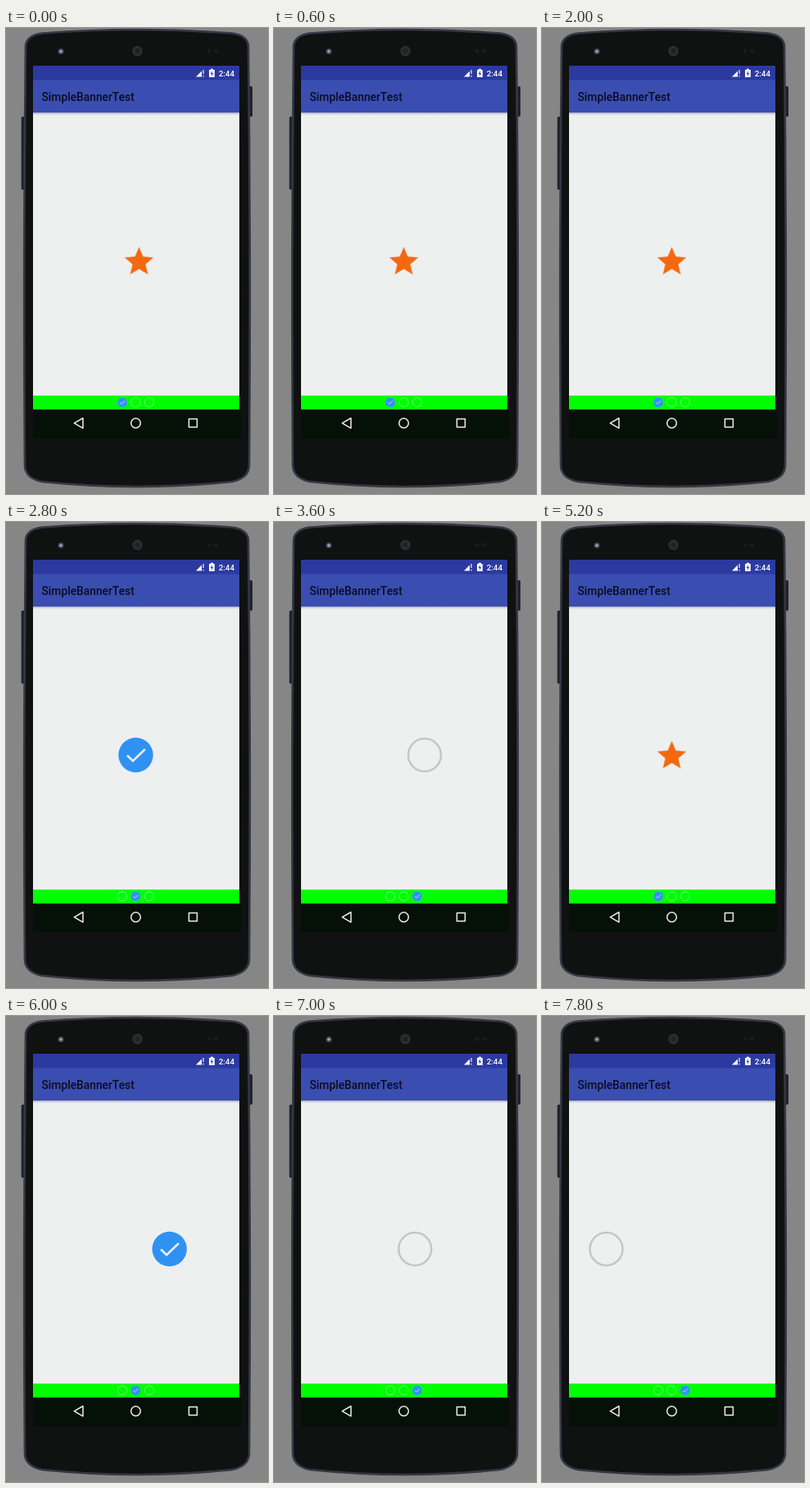
An HTML page that plays this animation: 320x568 px, repeating every 8000 ms.

```html
<!DOCTYPE html>
<html lang="en">
<head>
<meta charset="utf-8">
<title>Banner</title>
<style>
  html, body { margin: 0; width: 100%; height: 100%; overflow: hidden; background: #868686; }
  svg { display: block; width: 320px; height: 568px; }
  text { font-family: Roboto, sans-serif; }
</style>
</head>
<body>
<svg viewBox="0 0 320 568">
  <defs>
    <clipPath id="screen"><rect x="33" y="103" width="252" height="345"/></clipPath>
    <linearGradient id="shade" x2="0" y2="1">
      <stop stop-color="#a9aeb8"/><stop offset="1" stop-color="#eeefef"/>
    </linearGradient>
    <g id="tick">
      <circle r="21.2" fill="#2f92f3"/>
      <path d="M-10.5 0.5L-3.5 7.2L11.3-7" fill="none" stroke="#e6effa" stroke-width="2.7"/>
    </g>
  </defs>
  <rect width="320" height="568" fill="#868686"/>

  <!-- phone body -->
  <rect x="18.7" y="108" width="5" height="89" rx="1.5" fill="#20222b"/>
  <rect x="296" y="71" width="5" height="37" rx="1.5" fill="#20222b"/>
  <path d="M24 22Q25 9 44 6.5Q160-2.5 276 6.5Q295 9 296 22Q299 280 297 534Q296 549 276 553Q160 565 44 553Q24 549 23 534Q21 280 24 22Z"
        fill="#101111" stroke="#343844" stroke-width="2.6"/>
  <circle cx="160.5" cy="28" r="6.3" fill="#2c2d31"/>
  <circle cx="160.5" cy="28" r="3" fill="#202126"/>
  <circle cx="67" cy="28.5" r="3.5" fill="#454a59"/>
  <circle cx="67" cy="28.5" r="1.8" fill="#9aa3bd"/>
  <circle cx="248" cy="28" r="2.5" fill="#1b1c22"/>
  <circle cx="257" cy="28" r="2.5" fill="#1b1c22"/>

  <!-- app -->
  <rect x="33" y="46" width="252" height="18" fill="#2c3aa0"/>
  <rect x="33" y="63.5" width="252" height="39.5" fill="#3a4db1"/>
  <rect x="33" y="103" width="252" height="345" fill="#eeefef"/>
  <rect x="33" y="103" width="252" height="3" fill="url(#shade)"/>
  <text x="43.5" y="88.5" font-size="13.8" font-weight="500" fill="#0b0e1c">SimpleBannerTest</text>
  <path d="M232 59.5L239 52.5V59.5Z" fill="#fff"/>
  <path d="M241 51V56M241 57.8V59.5" stroke="#dfe2f4" stroke-width="1.3"/>
  <path d="M248 51H249.8V49.8H253V51H254.8V60H248Z" fill="#fff"/>
  <path d="M252 52L249.6 56H251.2L250.8 59L253.2 55H251.6Z" fill="#2c3aa0"/>
  <text x="279" y="58.5" font-size="9.8" font-weight="500" fill="#fff" text-anchor="end">2:44</text>

  <g clip-path="url(#screen)">
    <g class="page">
      <path transform="translate(-21.1 -20.6) scale(1.76)" fill="#f5680f" stroke="#e3b79a" stroke-width=".25"
            d="M12 17.27L18.18 21L16.54 13.97L22 9.24L14.81 8.63L12 2L9.19 8.63L2 9.24L7.46 13.97L5.82 21Z"/>
    </g>
    <g class="page"><use href="#tick"/></g>
    <g class="page"><circle r="20" fill="none" stroke="#c5c6c9" stroke-width="2.5"/></g>
  </g>

  <rect x="33" y="448" width="252" height="17" fill="#00fe00"/>
  <g fill="none" stroke="#7cf58a" stroke-width=".9">
    <circle cx="142" cy="456.3" r="5.6"/>
    <circle cx="158.4" cy="456.3" r="5.6"/>
    <circle cx="174.8" cy="456.3" r="5.6"/>
  </g>
  <use id="dot" href="#tick"/>

  <!-- navigation bar -->
  <rect x="33" y="465" width="254" height="35" fill="#051006"/>
  <g fill="none" stroke="#eee" stroke-width="1.5" stroke-linejoin="round">
    <path d="M94 475.5V487.8L83.3 481.6Z"/>
    <circle cx="158.5" cy="481.6" r="5.8"/>
    <rect x="223.4" y="476.6" width="10" height="10"/>
  </g>
</svg>
<script>
  const LOOP = 8000, STEP = 200, PAGE_WIDTH = 252, CENTER = 158.5, SLIDE = 408;
  const slideStarts = [2300, 3450, 4590, 5876, 6820, 7770];
  const pages = document.querySelectorAll('.page');
  const dot = document.getElementById('dot');

  const settle = x => 1 - (1 - Math.min(1, Math.max(0, x))) ** 5;

  // Pages scrolled so far; the last slide runs on into the next loop.
  function scrollAt(t) {
    const carried = settle((t + LOOP - slideStarts.at(-1)) / SLIDE) - 1;
    return slideStarts.reduce((sum, start) => sum + settle((t - start) / SLIDE), carried);
  }

  function draw(time) {
    const t = Math.floor(time % LOOP / STEP) * STEP;
    const scroll = scrollAt(t);
    pages.forEach((page, i) => {
      const raw = i - scroll + 1.5;
      const offset = raw - 3 * Math.floor(raw / 3) - 1.5;
      page.setAttribute('transform', `translate(${CENTER + offset * PAGE_WIDTH} 284)`);
    });
    const current = (Math.round(scroll) + 3) % 3;
    dot.setAttribute('transform', `translate(${142 + current * 16.4} 456.3) scale(.28)`);
  }

  const origin = performance.now();
  function tick() {
    draw(performance.now() - origin);
    requestAnimationFrame(tick);
  }
  tick();
</script>
</body>
</html>
```
